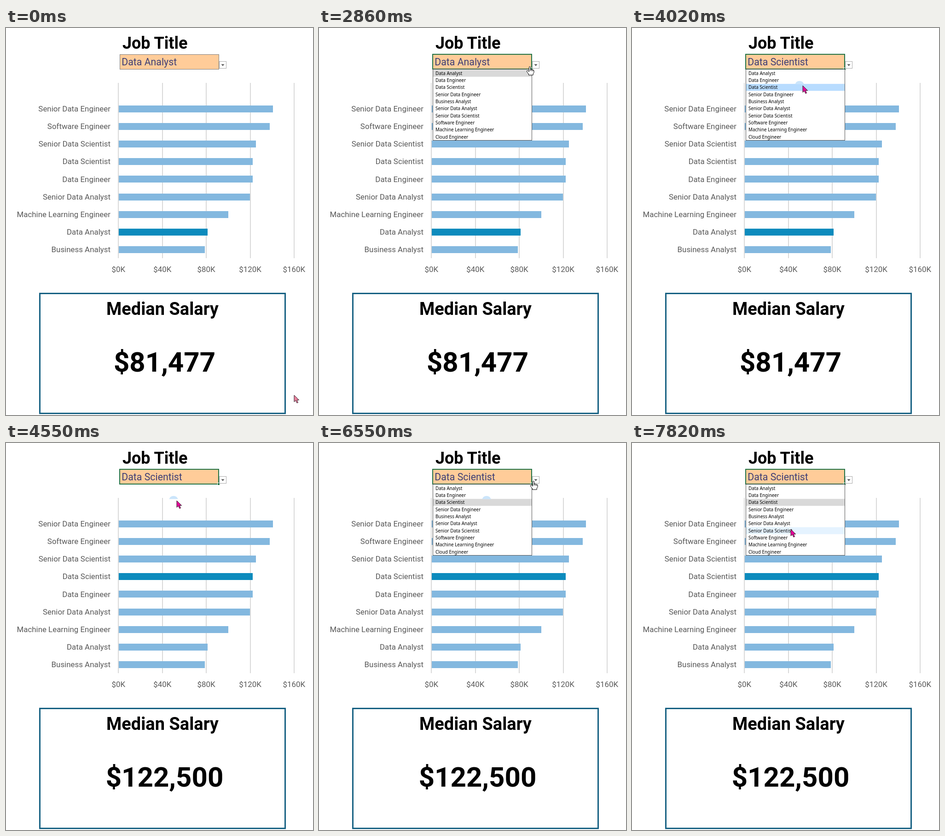
Animation, 667 px wide and 839 px high, one loop 8 s. Source, as an HTML page:

```html
<!DOCTYPE html>
<html lang="en">
<head>
<meta charset="utf-8">
<title>Job salary dashboard</title>
<style>
  html, body { margin: 0; width: 100%; height: 100%; overflow: hidden; background: #fff; }
  svg { display: block; width: 100%; height: 100%; font-family: Roboto, "Open Sans", sans-serif; }
  .heading { font-weight: 700; text-anchor: middle; }
  .label { font-size: 16.9px; fill: #595959; }
  .option { font: 9.9px "Noto Sans", "Open Sans", sans-serif; }
  #chart rect, #chart path { shape-rendering: crispEdges; }
</style>
</head>
<body>
<svg id="stage" viewBox="0 0 667 839">
  <text class="heading" x="323.7" y="45" font-size="36">Job Title</text>
  <g id="chart"></g>
  <rect x="73.5" y="575.5" width="533" height="260" fill="none" stroke="#156082" stroke-width="3"/>
  <text class="heading" x="340" y="622" font-size="38">Median Salary</text>
  <text class="heading" id="salary" x="344.5" y="745" font-size="60"></text>

  <rect x="247.5" y="57.5" width="215" height="32" fill="#ffcc99" stroke="#7f7f7f"/>
  <g id="selection">
    <rect x="247" y="57" width="215" height="32" fill="none" stroke="#217346" stroke-width="2"/>
    <rect x="459.5" y="86.5" width="5" height="5" fill="#217346" stroke="#fff"/>
  </g>
  <text id="value" x="251.3" y="81" font-size="21.3" fill="#3f3f76"></text>
  <rect x="463.5" y="72.5" width="15" height="15" fill="#fff" stroke="#ababab"/>
  <path d="M467.5 78.5h7l-3.5 4z" fill="#555"/>

  <g id="list">
    <rect x="247.5" y="89.5" width="215" height="154" fill="#fff" stroke="#555"/>
  </g>
  <path id="ripple" d="M354.3 121.5A10.4 10.4 0 0 1 373.7 121.5Z" fill="#cbe5fb"/>

  <path id="arrow" d="M0 0V14.5L3.4 11.5L6 17L8.5 16L6 10.6H10.7Z" stroke="#33202c" stroke-linejoin="round"/>
  <g id="hand" fill="#fff" stroke="#000" stroke-linejoin="round">
    <path d="M-1.5 11.5V1.5Q0-.5 1.5 1.5V7Q3.2 5.7 4.2 7.5Q5.8 6.4 6.8 8.2Q9 7.5 9 10V13.5L7.2 16V19H-2.5V17L-6.5 11.5Q-7 9-4.5 9.3Z"/>
    <path d="M1.5 7v3M4.2 7.5v3M6.8 8.2v2.5" fill="none"/>
  </g>
</svg>
<script>
const LOOP = 8000;
const ROW = 15.33, LIST_TOP = 90.5;
const BAR = '#83b8df', ACTIVE_BAR = '#0d8bbd';
const $ = id => document.getElementById(id);

function add(parent, tag, attrs, text = '') {
  const el = document.createElementNS('http://www.w3.org/2000/svg', tag);
  for (const key in attrs) el.setAttribute(key, attrs[key]);
  el.textContent = text;
  parent.append(el);
  return el;
}

// Chart
const jobs = [
  ['Senior Data Engineer', 580], ['Software Engineer', 573],
  ['Senior Data Scientist', 543], ['Data Scientist', 536],
  ['Data Engineer', 536], ['Senior Data Analyst', 530],
  ['Machine Learning Engineer', 483], ['Data Analyst', 438],
  ['Business Analyst', 432]
];
for (let i = 0; i <= 4; i++) {
  const x = 244.3 + i * 95.4;
  add($('chart'), 'path', { d: `M${Math.round(x)} 119V499`, stroke: '#d9d9d9', 'stroke-width': 2 });
  add($('chart'), 'text', { class: 'label', x, y: 529, 'text-anchor': 'middle' }, `$${i * 40}K`);
}
const bars = {};
jobs.forEach(([name, right], i) => {
  const y = 175.4 + i * 38.13;
  bars[name] = add($('chart'), 'rect', { x: 245, y: Math.round(y - 7.5), width: right - 245, height: 15 });
  add($('chart'), 'text', { class: 'label', x: 227, y: y + 5.6, 'text-anchor': 'end' }, name);
});

// Drop-down list
const options = ['Data Analyst', 'Data Engineer', 'Data Scientist', 'Senior Data Engineer',
  'Business Analyst', 'Senior Data Analyst', 'Senior Data Scientist', 'Software Engineer',
  'Machine Learning Engineer', 'Cloud Engineer'];
const rows = options.map((name, i) => {
  const y = LIST_TOP + i * ROW;
  const row = add($('list'), 'rect', { x: 248, y, width: 214, height: i < 9 ? ROW : 14.5 });
  add($('list'), 'text', { class: 'option', x: 253, y: y + 11.3 }, name);
  return row;
});

// Pointer moves: first step, last step, step count, destination
const start = [626, 796];
const moves = [
  [70, 460, 7, 462, 79],
  [720, 860, 3, 468, 79],
  [1390, 1390, 1, 471, 79],
  [2860, 2860, 1, 458, 83],
  [2930, 3420, 8, 371, 125],
  [4880, 5560, 11, 474, 78],
  [6550, 6550, 1, 466, 82],
  [6610, 7320, 11, 400, 139],
  [7390, 7820, 7, 345, 187]
];
const ease = p => p * p * (3 - 2 * p);

function pointerAt(t) {
  let [x, y] = start;
  for (const [from, to, count, endX, endY] of moves) {
    if (t < from) break;
    const interval = (to - from) / Math.max(1, count - 1);
    const step = t >= to ? count : Math.floor((t - from) / interval) + 1;
    const p = ease(step / count);
    x += (endX - x) * p;
    y += (endY - y) * p;
  }
  return [x, y];
}

const show = (id, on) => $(id).style.display = on ? '' : 'none';
const within = (t, from, to) => t >= from && t < to;

function draw(t) {
  const [x, y] = pointerAt(t);
  const chosen = t >= 3680 ? 2 : 0;
  const charted = t >= 4380 ? 'Data Scientist' : 'Data Analyst';
  const open = within(t, 2130, 4300) || t >= 5960;
  const hand = t >= 1390 && y < 90;
  const hovered = hand ? -1 : Math.floor((y - LIST_TOP) / ROW);

  $('value').textContent = options[chosen];
  $('salary').textContent = t >= 4380 ? '$122,500' : '$81,477';
  for (const name in bars) bars[name].setAttribute('fill', name === charted ? ACTIVE_BAR : BAR);
  rows.forEach((row, i) => {
    const hot = i === hovered;
    const fill = i === chosen ? (hot ? '#b8dcff' : '#d9d9d9') : (hot ? '#e5f3ff' : '#fff');
    row.setAttribute('fill', fill);
  });

  show('selection', t >= 1390);
  show('list', open);
  show('ripple', within(t, 3680, 7000));
  show('hand', hand);
  show('arrow', !hand);
  $('arrow').setAttribute('fill', t < 1390 ? '#e8809c' : '#e6009a');
  for (const id of ['hand', 'arrow']) $(id).setAttribute('transform', `translate(${x} ${y})`);
}

const began = performance.now();
function tick() {
  draw((performance.now() - began) % LOOP);
  requestAnimationFrame(tick);
}
tick();
</script>
</body>
</html>
```
